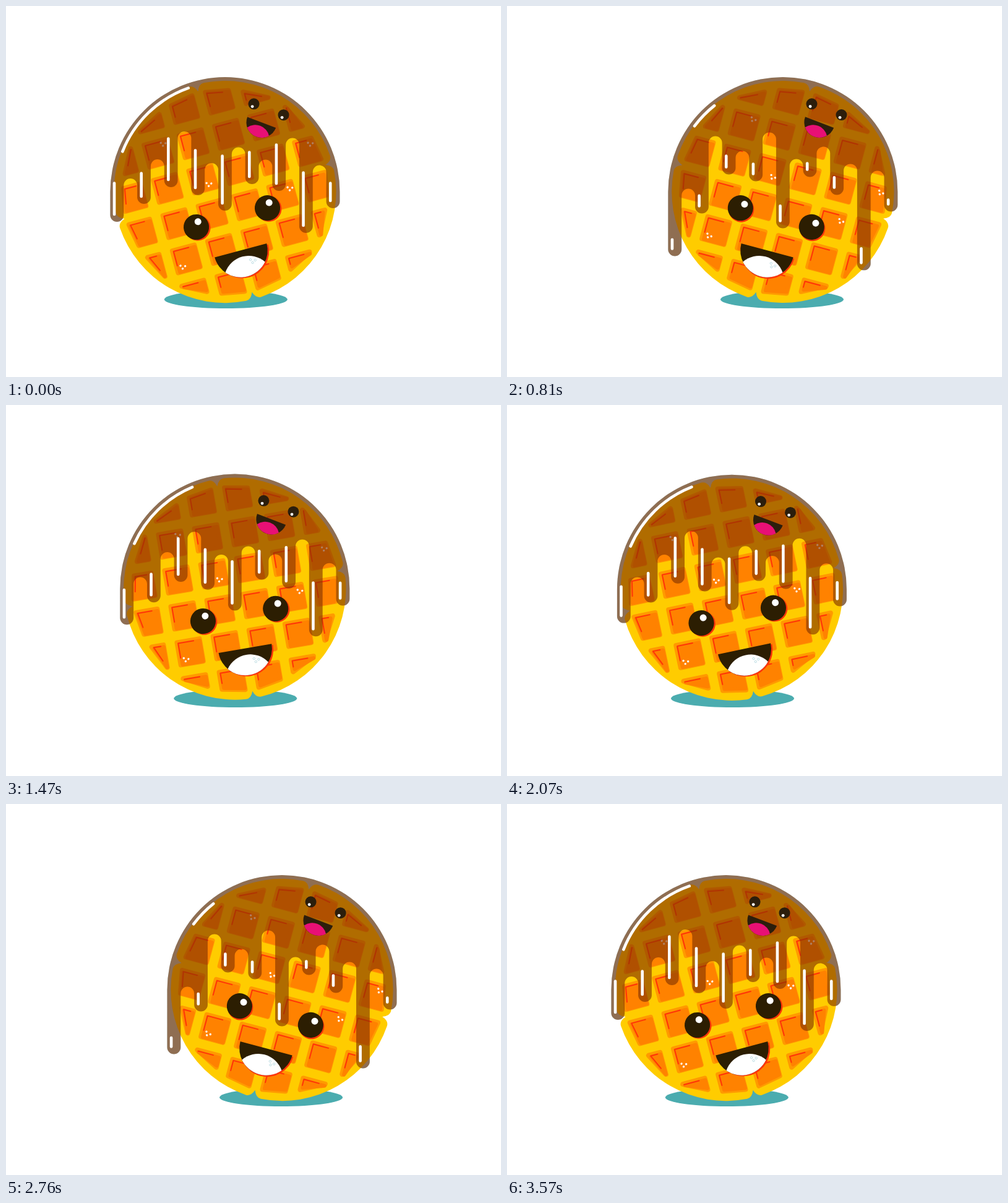
An HTML page that plays this animation: 800 px wide and 600 px high, repeating every 3.6 s.

```html
<!DOCTYPE html>
<html lang="en">
<head>
<meta charset="utf-8">
<title>Waffle</title>
<style>
  html, body { margin: 0; width: 100%; height: 100%; overflow: hidden; background: #fff; }
  svg { display: block; width: 800px; height: 600px; }
</style>
</head>
<body>
<svg id="stage" viewBox="0 0 800 600">
  <defs>
    <path id="grin" d="M-43.5 0H43.5A43.5 43.5 0 0 1 -43.5 0Z"/>
    <path id="tongue" d="M-33.2 28.1A40 40 0 0 1 33.2 28.1A43.5 43.5 0 0 1 -33.2 28.1Z"/>
    <g id="crumbs">
      <circle cx="-3.4" cy="-2.4" r="1.7"/><circle cx="3.8" cy=".2" r="1.7"/><circle cx="-1.3" cy="3.1" r="1.7"/>
    </g>
    <g id="eye">
      <circle cx="1.8" cy="1.8" r="20.7" fill="#ff3508"/>
      <circle r="20.6" fill="#2c1e02"/>
      <circle cx="4.8" cy="-7.7" r="5.5" fill="#fff"/>
    </g>
    <g id="smallEye">
      <circle r="9" fill="#2c1e0c"/><circle cx="-2.4" cy="4.2" r="2.4" fill="#fff"/>
    </g>
  </defs>
  <ellipse id="shadow" cy="474.5" rx="99.5" ry="14.5" fill="#4bacaf"/>
  <path id="rim" fill="#a7d2da"/>
  <g id="waffle">
    <path id="body" fill="#ffcc00"/>
    <g id="cells" stroke-linejoin="round" stroke-linecap="round"></g>
    <use href="#eye" x="-59.5" y="-135"/>
    <use href="#eye" x="59.5" y="-135"/>
    <g transform="translate(0 -80)">
      <use href="#grin" x="2" y="2" fill="#ff3508"/>
      <use href="#grin" fill="#2c1e02"/>
      <use href="#tongue" fill="#fff"/>
    </g>
    <g id="specks" fill="#fff"></g>
  </g>
  <path id="syrup" fill="#803200" fill-opacity=".625"/>
  <g id="top">
    <g id="shine" fill="none" stroke="#fff" stroke-width="4.6" stroke-linecap="round"></g>
    <use href="#smallEye" x="46.6" y="-142.2"/>
    <use href="#smallEye" x="94.6" y="-124.4"/>
    <g transform="translate(59.2 -112.3) rotate(21) scale(.568)">
      <use href="#grin" fill="#2c1e0c"/>
      <use href="#tongue" fill="#e81075"/>
    </g>
  </g>
</svg>
<script>
const $ = id => document.getElementById(id);
const PIVOT = { x: 400, y: 472.5 }, LIFT = 178, RAD = Math.PI / 180;
const SWING = 15, HALF = 900, STEP = 30;
const SYRUP_R = 185.5, COL = SYRUP_R * 2 / 17, TIP = COL / 2;

// [start, end] heights relative to the waffle centre
const dripEnds = [[48.5, 104], [19.5, 35], [-7.5, -28], [5.5, -17], [30.5, 59],
                  [-12.5, -24], [-1.5, 5], [66.5, 127], [26.5, 32]];
const gapTops = [[-21.5, -5], [-52.5, -90], [-97.5, -66], [-46.5, -96],
                 [-72, -53], [-52, -73], [-87, -45], [-43, -34]];
const shineTops = [[-16, 75.5], [-32, 4.5], [-88, -60], [-69, -47], [-60, 21],
                   [-66, -48], [-78, -25], [-33, 90], [-16, 11]];

const lerp = ([a, b], p) => a + (b - a) * p;
const mix = (a, b, p) => [lerp([a[0], b[0]], p), lerp([a[1], b[1]], p)];
const clamp = (v, lo, hi) => Math.min(hi, Math.max(lo, v));
const polar = (r, deg) => [r * Math.cos(deg * RAD), r * Math.sin(deg * RAD)];
const line = pts => 'M' + pts.map(p => p.map(v => v.toFixed(2)).join(' ')).join('L');

function add(parent, tag, attrs) {
  const el = document.createElementNS('http://www.w3.org/2000/svg', tag);
  for (const k in attrs) el.setAttribute(k, attrs[k]);
  return parent.appendChild(el);
}

// round body with a notch at the end of each middle bar
function bodyPath() {
  const r = 179.6, off = ([x, y]) => `${x.toFixed(2)} ${(y - LIFT).toFixed(2)}`;
  let d = '';
  for (let a = 0; a < 360; a += 90) {
    d += `${d ? 'L' : 'M'}${off(polar(168, a))}Q${off(polar(r, a + 1.3))} ${off(polar(r, a + 4))}`
       + `A${r} ${r} 0 0 1 ${off(polar(r, a + 86))}Q${off(polar(r, a + 88.7))} ${off(polar(168, a + 90))}`;
  }
  return d + 'Z';
}

// box corners TL, TR, BR, BL pulled in to the circle of radius r
function fitBox(left, top, right, bottom, r) {
  return [[left, top], [right, top], [right, bottom], [left, bottom]].map(([x, y]) => {
    if (Math.hypot(x, y) <= r) return [x, y];
    if (Math.abs(x) > Math.abs(y))
      x = clamp(Math.sign(x) * Math.sqrt(r * r - y * y), left, right);
    else
      y = clamp(Math.sign(y) * Math.sqrt(r * r - x * x), top, bottom);
    return [x, y];
  });
}

function buildWaffle() {
  $('body').setAttribute('d', bodyPath());
  const cells = $('cells'), pitch = 59, h = 18.3;
  cells.setAttribute('transform', `translate(0 ${-LIFT})`);
  for (let row = 0; row < 6; row++) for (let col = 0; col < 6; col++) {
    const x = (col - 2.5) * pitch, y = (row - 2.5) * pitch;
    if (Math.hypot(x, y) > 200) continue;
    const fill = (inset, r, color, width) => add(cells, 'path', {
      d: line(fitBox(x - h + inset, y - h + inset, x + h, y + h, r)) + 'Z',
      fill: color, stroke: color, 'stroke-width': width
    });
    fill(0, 164, '#ff9a00', 8);
    fill(3, 162, '#ff8200', 6);
    const [tl, tr, , bl] = fitBox(x - h + 1.5, y - h + 1.5, x + h, y + h, 162);
    add(cells, 'path', {
      d: line([mix(tl, bl, .68), tl, mix(tl, tr, .72)]),
      fill: 'none', stroke: '#ff3508', 'stroke-width': 2
    });
  }
  const spots = [[-21.7, -197], [103, -156.5], [-97, -78.8], [-76.3, -279], [153.5, -217.5]];
  for (const [x, y] of spots) add($('specks'), 'use', { href: '#crumbs', x, y });
  add($('specks'), 'use', { href: '#crumbs', x: 14.8, y: -59, stroke: '#a7d2da', 'stroke-width': .7 });
}

function syrupPath(p) {
  let x = SYRUP_R, d = `M${-x} 0A${x} ${x} 0 0 1 ${x} 0`;
  for (let i = 8; i >= 0; i--) {
    d += `V${lerp(dripEnds[i], p) - TIP}A${TIP} ${TIP} 0 0 1 ${x -= COL} ${lerp(dripEnds[i], p) - TIP}`;
    if (i) {
      const top = lerp(gapTops[i - 1], p) + TIP;
      d += `V${top}A${TIP} ${TIP} 0 0 0 ${x -= COL} ${top}`;
    }
  }
  return d + 'Z';
}

function shinePath(p) {
  const r = 178, a = polar(r, 201.5 + 15.2 * p), b = polar(r, 250.6 - 19.1 * p);
  let d = `M${a}A${r} ${r} 0 0 1 ${b}`;
  dripEnds.forEach((end, i) => {
    const x = (i - 4) * 2 * COL - 4.3;
    d += `M${x} ${lerp(shineTops[i], p) + 2}V${lerp(end, p) - 12}`;
  });
  return d;
}

function ease(x) {
  const k = 3.2;
  return x < .5 ? .5 * (2 * x) ** k : 1 - .5 * (2 - 2 * x) ** k;
}

buildWaffle();
const shine = add($('shine'), 'path', {});

function draw(now) {
  const t = Math.floor(now / STEP) * STEP + 6;
  const u = (t / HALF) % 2;
  const p = u < 1 ? ease(u) : 1 - ease(u - 1);
  const angle = SWING * (2 * p - 1);
  const cx = PIVOT.x + LIFT * Math.sin(angle * RAD);
  const cy = PIVOT.y - LIFT * Math.cos(angle * RAD);
  const move = `translate(${cx} ${cy})`, d = syrupPath(p);

  $('shadow').setAttribute('cx', PIVOT.x + (cx - PIVOT.x) * .97);
  $('waffle').setAttribute('transform', `translate(${PIVOT.x} ${PIVOT.y}) rotate(${angle})`);
  for (const id of ['rim', 'syrup']) {
    $(id).setAttribute('d', d);
    $(id).setAttribute('transform', move);
  }
  $('top').setAttribute('transform', move);
  shine.setAttribute('d', shinePath(p));
}

function tick() {
  draw(performance.now());
  requestAnimationFrame(tick);
}
tick();
</script>
</body>
</html>
```
